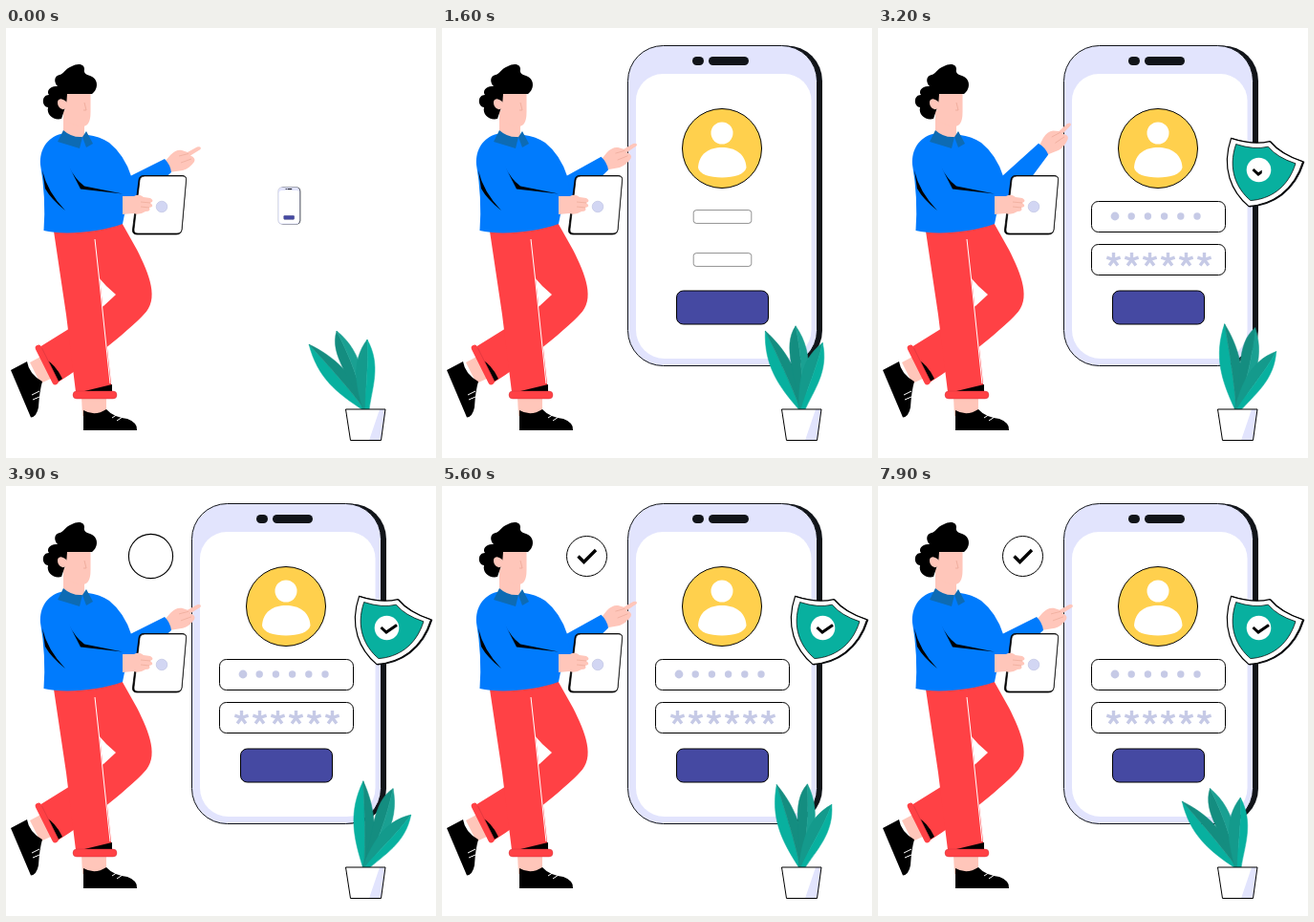
Recreate the animation shown at these times as an HTML page with a canvas. Size 450 by 450 pixels, loop 8000 ms.

```html
<!DOCTYPE html>
<html lang="en">
<head>
<meta charset="utf-8">
<title>Secure login</title>
<style>
html, body { margin: 0; width: 100%; height: 100%; overflow: hidden; background: #fff; }
canvas { display: block; width: 450px; height: 450px; }
</style>
</head>
<body>
<canvas id="stage"></canvas>
<script>
const LOOP = 8000, STEP = 100;
const INK = '#000', SIDE = '#111419', SKIN = '#ffc6ba', BLUE = '#007bfd', RED = '#ff4145',
      LAVENDER = '#e2e4fd', GREY = '#c6cae6', TEAL = '#08b09f', DARK_TEAL = '#148d80';

const canvas = document.getElementById('stage');
const ctx = canvas.getContext('2d');
const ratio = window.devicePixelRatio || 1;
canvas.width = canvas.height = 450 * ratio;

// Drawing helpers
function paint(path, fill, stroke, width = 1) {
  if (fill) { ctx.fillStyle = fill; ctx.fill(path); }
  if (stroke) { ctx.strokeStyle = stroke; ctx.lineWidth = width; ctx.stroke(path); }
}
const shape = (d, fill, stroke, width) => paint(new Path2D(d), fill, stroke, width);

function disc(x, y, r, fill, stroke, width) {
  const p = new Path2D();
  p.arc(x, y, r, 0, Math.PI * 2);
  paint(p, fill, stroke, width);
}

function box(x, y, w, h, r, fill, stroke, width) {
  const p = new Path2D();
  p.roundRect(x, y, w, h, r);
  paint(p, fill, stroke, width);
}

function around(x, y, scale, angle, draw) {
  if (scale <= 0) return;
  ctx.save();
  ctx.translate(x, y);
  ctx.rotate(angle * Math.PI / 180);
  ctx.scale(scale, scale);
  ctx.translate(-x, -y);
  draw();
  ctx.restore();
}

// Reveals a drawing from left to right
function wipe(x, y, w, h, part, draw) {
  if (part <= 0) return;
  ctx.save();
  ctx.beginPath();
  ctx.rect(x, y, w * part, h);
  ctx.clip();
  draw();
  ctx.restore();
}

// Timing helpers
function pop(t, start, over = 2, length = 500) {
  const x = (t - start) / length;
  if (x <= 0) return 0;
  if (x >= 1) return 1;
  const u = x - 1;
  return 1 + (over + 1) * u ** 3 + over * u * u;
}

// cubic-bezier(.4, 0, .2, 1)
function ease(x) {
  if (x <= 0) return 0;
  if (x >= 1) return 1;
  let lo = 0, hi = 1, u = 0.5;
  for (let i = 0; i < 24; i++) {
    u = (lo + hi) / 2;
    const v = 1 - u;
    if (1.2 * v * v * u + 0.6 * v * u * u + u ** 3 < x) lo = u; else hi = u;
  }
  return u * u * (3 - 2 * u);
}
const reveal = (t, start) => ease((t - start) / 400);

function swing(t) {
  const p = (t % 2000) / 1000;
  return p < 1 ? ease(p) : 1 - ease(p - 1);
}

function phone(t) {
  around(296.5, 186, pop(t, -12), 0, () => {
    box(205, 18.5, 193, 335, 37, SIDE);
    box(194.5, 18.5, 198, 335, 37, LAVENDER, SIDE);
    box(203, 48, 183.5, 298, [28, 28, 30, 30], '#fff');
    box(262, 30, 12, 9, 4.5, SIDE);
    box(279, 30, 42, 9, 4.5, SIDE);
    box(245.5, 275, 96, 35, 7, '#4549a2', INK);
  });
}

function avatar(t) {
  around(293, 126, pop(t, 600), 0, () => {
    disc(293, 126, 41.5, '#ffd04d', INK);
    disc(293, 110, 11.5, '#fff');
    shape('M268 146 C269 131 280 125 293 125 S317.500 131 318.500 146 C317 153 306 156.500 293 156.500 S269 153 268 146Z', '#fff');
  });
}

function star(x, y, r) {
  ctx.strokeStyle = GREY;
  ctx.lineWidth = 3.4;
  ctx.beginPath();
  for (let i = 0; i < 5; i++) {
    const a = -Math.PI / 2 + i * Math.PI * 0.4;
    ctx.moveTo(x, y);
    ctx.lineTo(x + r * Math.cos(a), y + r * Math.sin(a));
  }
  ctx.stroke();
}

function fields(t) {
  const size = pop(t, 1550);
  for (const y of [197.5, 242.5])
    around(293.5, y, size, 0, () => box(223.5, y - 16, 140, 32, 7, '#fff', INK));
  wipe(236, 185, 116, 70, reveal(t, 2050), () => {
    for (let i = 0; i < 6; i++) {
      disc(248 + i * 17.2, 197, i ? 3.7 : 4.4, GREY);
      star(246.5 + i * 19, 242.5, 7.5);
    }
  });
}

const SHIELD = new Path2D('M-39.500 -25 Q-15 -25 0 -34.500 Q15 -25 39.500 -25 C40 8 22 28 0 37 C-22 28 -40 8 -39.500 -25Z');

function shield(t) {
  around(406, 152, pop(t, 2600), 0, () => {
    ctx.save();
    ctx.translate(399.4, 151.4);
    ctx.rotate(18 * Math.PI / 180);
    ctx.translate(1.2, 0);
    paint(SHIELD, SIDE, SIDE);
    ctx.translate(-1.2, 0);
    paint(SHIELD, '#fff', INK, 1.2);
    ctx.scale(0.83, 0.83);
    paint(SHIELD, TEAL, INK, 0.8);
    ctx.restore();
    disc(398.5, 148.5, 12.8, '#fff');
  });
  wipe(390, 140, 21, 18, reveal(t, 3050), () =>
    shape('M392.500 148 L398 153 L409 145.500', null, INK, 3));
}

function badge(t) {
  around(151.5, 73.5, pop(t, 3550), 0, () => disc(151.5, 73.5, 21, '#fff', INK));
  wipe(140, 62, 24, 24, reveal(t, 4050), () =>
    shape('M142.500 73.500 L148.500 79.500 L161 67', null, INK, 3.4));
}

// Each side and the midrib are cubic curves from the tip to the shared base
function leaf(tip, left, mid, right, leftColour, rightColour) {
  shape(`M376 400 C${mid} ${tip} C${left} 374 400Z`, leftColour, leftColour, 0.5);
  shape(`M376 400 C${mid} ${tip} C${right} 380 400Z`, rightColour, rightColour, 0.5);
}

function plant(t) {
  const lean = 41 * (1 - Math.abs(t - LOOP / 2) / (LOOP / 2));
  around(376, 398, 1, lean, () => {
    leaf('317 331', '326 366 346 382', '358 376 340 356', '342 343 365 362', TEAL, DARK_TEAL);
    leaf('346 317', '338 343 362 366', '370 370 360 344', '376 341 374 374', DARK_TEAL, '#1aa092');
    leaf('378 326', '360 350 367 376', '376 378 380 350', '393 353 383 376', '#149a8c', TEAL);
  });
  shape('M355.500 399 H397 L392.500 431.500 H360.500Z', '#fff');
  shape('M391 399 H397 L392.500 431.500 H380Z', LAVENDER);
  shape('M355.500 399 H397 L392.500 431.500 H360.500Z', null, INK);
}

// The sleeve hinges at the elbow while the hand follows the shoulder
function farArm(t) {
  const angle = -16.5 * swing(t), a = angle * Math.PI / 180;
  const turn = (x, y) => {
    const dx = x - 102, dy = y - 121;
    return [102 + dx * Math.cos(a) - dy * Math.sin(a), 121 + dx * Math.sin(a) + dy * Math.cos(a)];
  };
  around(102, 121, 1, angle, () => {
    shape('M166 140 L172 133 Q178 127 184 128 L190 130 L200 124.500 Q205 123.500 203.500 127 L193 133.500 Q199 136 197 140 Q192 147 185 149 L171 151Z', SKIN);
    shape('M181 134 L191 131.500 M183 141 L194 137', null, '#e8a493', 0.6);
  });
  shape(`M118 165 L130 155 L${turn(166, 137)} Q${turn(172, 143)} ${turn(173, 151)} L146 176 L118 176Z`, BLUE);
}

function legs() {
  // Back foot and leg
  shape('M25 350 L38 343 L49 366 L36 372Z', SKIN);
  shape('M5 358 L22 349 Q24 362 38 370 Q35 380 34 397 Q32 407 26 407.500Z', INK);
  shape('M27 384 L35 380 M28 389 L35 386', null, '#fff', 1);
  shape('M88 206 L119 200 L137 232 C150 258 161 284 144 300 C128 317 85 352 54 371 L35 334 L64 316 L102 291 L115 279 Q104 270 96 260Z', RED);
  shape('M40 346 Q52 352 59 367 L53 371Z', INK);
  ctx.lineCap = 'round';
  shape('M34 335 L51.500 370', null, RED, 6.5);
  ctx.lineCap = 'butt';
  shape('M37.500 335 L54.500 369', null, '#c9303a', 0.5);
  // Front foot and leg
  shape('M79 386 H105 V406 H80Z', SKIN);
  shape('M81 400 Q93 407 105 399 Q112 407 127 409 Q138 413 137 421 H81Z', INK);
  shape('M111 408 L117 404 M116 411 L122 407', null, '#fff', 1);
  shape('M49 206 L94 206 L98 262 L111 381 H73 L63 300Z', RED);
  shape('M93 221 L97.500 262 L109 372', null, '#fff', 1);
  shape('M82 380 L111 373 V381Z', INK);
  box(70, 380, 46, 8, 4, RED, '#c9303a', 0.4);
}

function torso() {
  shape('M57 111 C43 115 35 127 36 143 Q42 177 39.500 212 C60 217 97 214 122 205 L124 195 L136 180 L131 155 Q124 133 108 120 Q97 113 86 112Z', BLUE);
  shape('M38 149 Q43 171 62 191 Q47 179 41 168Z', INK);
  shape('M66 145 Q72 158 82 165.500 L122 173.500 L78 168.500Z', INK);
}

function head() {
  shape('M60 86 L82 98 L82 113 Q72 123 60 109Z', SKIN);
  shape('M60 107 L54 119 L77 126 L80 114Q69 115 60 107Z M80 114 L84 108 L91 121 L84 125Z', '#0d6bb4');
  shape('M62 67 H88.500 V88 Q88.500 103 80 103 Q70 103 61 94Z', SKIN);
  shape('M64 69 L90 69 C97 64 97 53 88 50 C84 49 81 47 82 43 C82 37 74 37 69 40 C61 43 61 48 56 49 C50 50 50 57 54 61 C46 60 42 66 45 70 C37 70 37 82 44 83 C42 91 50 97 58 95 L62 83 Q64 76 64 69Z', INK);
  shape('M63 77 C56 71 52 76 55 82 Q58 87 63 84Z', SKIN);
  shape('M82 78 L84 86 L81 86', null, '#eca797', 0.8);
}

function tablet() {
  shape('M144 154.500 H184 Q189 154.500 188.500 159 L184 211 Q183.500 216 178 216 H137 Q132 216 132.500 211 L139 159 Q139.500 154.500 144 154.500Z', INK, INK, 0.8);
  shape('M145 155 H184.500 Q189 155 188.500 159 L184 210.500 Q183.500 215 179 215 H138 Q133.500 215 134 210.500 L140 159 Q140.500 155 145 155Z', '#fff', INK, 0.7);
  disc(163, 187, 5.8, '#d2d6f3', '#b9bee0', 0.6);
  shape('M122 176 L134 176 Q139 173 144 177 L151 178 Q156 181 151 183 Q156 187 150 188 Q152 192 146 192 Q140 196 133 194 L122 195Z', SKIN);
  shape('M141 182 L151 183 M141 187 L150 188', null, '#e8a493', 0.6);
}

function draw(t) {
  ctx.setTransform(ratio, 0, 0, ratio, 0, 0);
  ctx.fillStyle = '#fff';
  ctx.fillRect(0, 0, 450, 450);
  phone(t);
  avatar(t);
  fields(t);
  shield(t);
  badge(t);
  plant(t);
  legs();
  farArm(t);
  torso();
  head();
  tablet();
}

const began = performance.now();
function tick() {
  const t = (performance.now() - began) % LOOP;
  draw(Math.floor(t / STEP) * STEP);
  requestAnimationFrame(tick);
}
tick();
</script>
</body>
</html>
```
